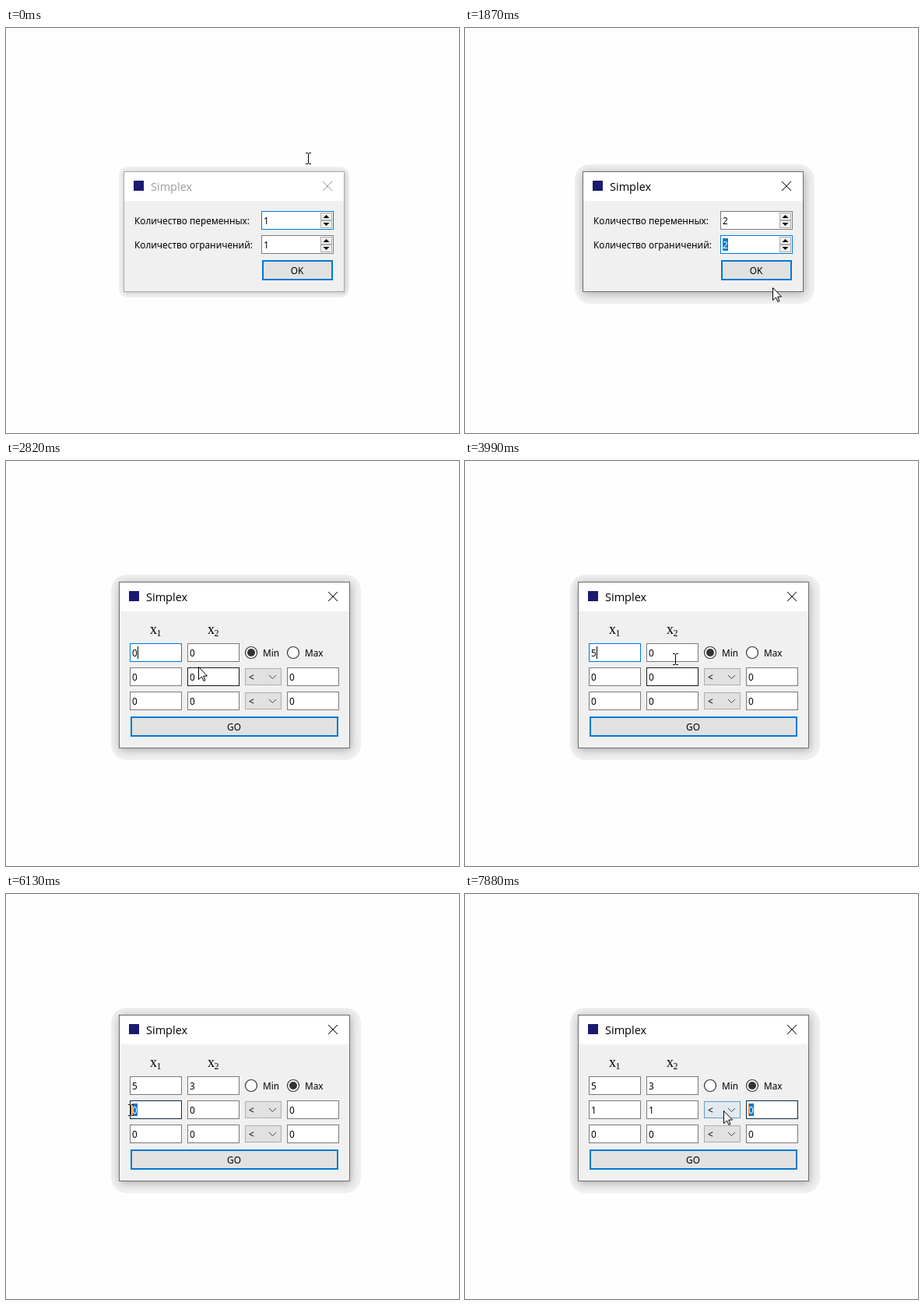
Animation, 582 px wide and 520 px high, one loop 8 s. Source, as an HTML page with a canvas:

```html
<!DOCTYPE html>
<html lang="ru">
<head>
<meta charset="utf-8">
<title>Simplex</title>
<style>
html, body { margin: 0; width: 100%; height: 100%; overflow: hidden; background: #fefefe; }
canvas { display: block; }
</style>
</head>
<body>
<canvas id="stage" width="582" height="520"></canvas>
<script>
const ctx = document.getElementById('stage').getContext('2d');
const LOOP = 8000, STEPS = 60, SWITCH = 19;
const BLUE = '#0078d7', GREY = '#7a7a7a', DARK = '#171717', DEEP = '#0a2c48', FACE = '#f0f0f0';
const UI = '11.8px "Noto Sans", sans-serif';

// Pointer moves: start step, end step, x, y
const moves = [
  [1, 5, 411, 241], [8, 9, 412, 273], [11, 14, 395, 333], [14, 17, 374, 315],
  [18, 22, 205, 247], [25, 27, 104, 250], [28, 29, 250, 278], [29, 30, 270, 254],
  [33, 35, 185, 248], [36, 38, 330, 278], [38, 39, 373, 243], [41, 43, 200, 276],
  [43, 48, 134, 278], [49, 51, 265, 279], [51, 53, 227, 279], [55, 57, 395, 279],
  [57, 59, 332, 278]
];

// Each edit drags a selection from `press` on, then types a digit
const edits = [
  { col: 0, row: 0, value: 5, press: 25, type: 28 },
  { col: 1, row: 0, value: 3, press: 33, type: 36 },
  { col: 0, row: 1, value: 1, press: 43, type: 49 },
  { col: 1, row: 1, value: 1, press: 51, type: 55 },
  { col: 2, row: 1, value: 0, press: 57, type: STEPS }
];

const colX = [159, 233, 361], rowY = row => 234 + 31 * row;
const cells = [];
for (let row = 0; row < 3; row++)
  for (let col = 0; col < (row ? 3 : 2); col++) cells.push({ col, row });

let step, now, before;

function pointer(i) {
  let x = 388, y = 167;
  for (const [from, to, tx, ty] of moves) {
    const k = Math.max(0, Math.min(1, (i - from) / (to - from)));
    x += (tx - x) * k;
    y += (ty - y) * k;
  }
  return [Math.round(x), Math.round(y)];
}

const inside = ([px, py], x, y, w, h) => px >= x && px < x + w && py >= y && py < y + h;

function rect(x, y, w, h, color) {
  ctx.fillStyle = color;
  ctx.fillRect(x, y, w, h);
}

function box(x, y, w, h, fill, edge, line = 1) {
  rect(x, y, w, h, edge);
  rect(x + line, y + line, w - 2 * line, h - 2 * line, fill);
}

function text(s, x, y, color = '#000', font = UI, align = 'left') {
  ctx.font = font;
  ctx.fillStyle = color;
  ctx.textAlign = align;
  ctx.fillText(s, x, y);
}

function poly(points, fill, edge, closed = true) {
  ctx.beginPath();
  points.forEach(([x, y]) => ctx.lineTo(x, y));
  if (closed) ctx.closePath();
  if (fill) { ctx.fillStyle = fill; ctx.fill(); }
  if (edge) { ctx.strokeStyle = edge; ctx.lineWidth = 1; ctx.stroke(); }
}

function disc(x, y, r, fill, edge) {
  ctx.beginPath();
  ctx.arc(x, y, r, 0, 7);
  ctx.fillStyle = fill;
  ctx.fill();
  if (edge) { ctx.strokeStyle = edge; ctx.lineWidth = 1.2; ctx.stroke(); }
}

function frame(x, y, w, h, active) {
  const [l, t, r, b] = active ? [10, 9, 14, 15] : [6, 6, 6, 7];
  ctx.save();
  ctx.beginPath();
  ctx.roundRect(x - l, y - t, w + l + r, h + t + b, active ? 20 : 12);
  ctx.fillStyle = FACE;
  ctx.fill();
  ctx.clip();
  ctx.shadowColor = active ? 'rgba(0,0,0,.3)' : 'rgba(0,0,0,.2)';
  ctx.shadowBlur = active ? 11 : 6;
  ctx.shadowOffsetX = 1;
  ctx.shadowOffsetY = active ? 2 : 1;
  rect(x, y, w, h, '#777');
  ctx.restore();

  box(x, y, w, h, FACE, active ? '#6e6e6e' : '#a8a8a8');
  rect(x + 1, y + 1, w - 2, 37, '#fff');
  rect(x + 13, y + 12, 13, 13, '#1a1a70');
  const ink = active ? '#000' : '#999';
  text('Simplex', x + 35, y + 25, ink, '14.5px "Open Sans", sans-serif');
  const cx = x + w - 22, cy = y + 19;
  for (const d of [6, -6]) poly([[cx - 6, cy - d], [cx + 6, cy + d]], null, ink, false);
}

function content(s, x, y, selected) {
  if (selected) rect(x, y - 13, 7, 16, BLUE);
  text(s, x, y, selected ? '#fff' : '#000');
}

const edgeColor = (hover, focused) =>
  hover ? (focused ? DEEP : DARK) : focused ? BLUE : GREY;

function spin(y, value, focused, selected) {
  const area = [328, y, 93, 24];
  const hover = inside(now, ...area) || inside(before, ...area);
  box(...area, '#fff', edgeColor(hover, focused));
  content(value, 331, y + 17, selected);
  const lit = inside(before, 404, y, 16, 24);
  for (const [top, d] of [[y + 2, -2], [y + 12, 2]]) {
    box(404, top, 15, 10, lit ? '#e2ecf4' : FACE, lit ? '#9db8cc' : '#acacac');
    const cy = top + 5;
    poly([[407.5, cy - d], [415.5, cy - d], [411.5, cy + d]], '#000');
  }
}

function button(label, x, y, w, pressed) {
  const hover = inside(now, x, y, w, 26);
  if (pressed) box(x, y, w, 26, '#d5e8f8', '#0060a8');
  else box(x, y, w, 26, hover ? '#e5f1fb' : '#e1e1e1', BLUE, 2);
  text(label, x + w / 2 - .5, y + 18, '#000', UI, 'center');
}

function sizeDialog() {
  frame(151, 184, 284, 155, step > 0 && step < SWITCH - 1);
  text('Количество переменных:', 165, 252);
  text('Количество ограничений:', 165, 283);
  spin(235, step < 6 ? 1 : 2, step < 10, step >= 6 && step < 10);
  spin(266, step < 11 ? 1 : 2, step >= 10, step >= 11 && step < 17);
  button('OK', 329, 298, 91, step >= 17);
}

function field({ col, row }) {
  const x = colX[col], y = rowY(row);
  const edit = edits.find(e => e.col === col && e.row === row);
  const current = edits.findLast(e => step >= e.press) || edits[0];
  const focused = edit === current;
  const typed = edit && step >= edit.type;
  const selected = focused && step > edit.press && !typed;
  box(x, y, 67, 24, '#fff', edgeColor(inside(before, x, y, 67, 24), focused));
  content(typed ? edit.value : 0, x + 3, y + 17, selected);
  if (selected) rect(x + 3, y + 4, 1, 16, '#ff8728');
  else if (focused) rect(x + 10, y + 4, 1, 16, '#000');
}

function combo(y) {
  const area = [307, y, 47, 22];
  const lit = inside(now, ...area) || inside(before, ...area);
  box(...area, lit ? '#e2e9ef' : '#e1e1e1', lit ? '#6a9abf' : '#adadad');
  text('<', 312, y + 16);
  poly([[338, y + 9], [342.5, y + 13.5], [347, y + 9]], null, '#444', false);
}

function radio(label, x, checked) {
  const lit = inside(now, x - 8, 238, 46, 17);
  disc(x, 246, 7.5, '#fff', lit ? BLUE : '#333');
  if (checked) disc(x, 246, 5, '#333');
  text(label, x + 15, 251);
}

function taskDialog() {
  frame(145, 155, 297, 214, step > SWITCH);
  [185, 259].forEach((x, n) => {
    text('x', x, 222, '#000', '18px "Liberation Serif", serif');
    text(n + 1, x + 8.5, 225, '#000', '12px "Liberation Serif", serif');
  });
  cells.forEach(field);
  radio('Min', 315, step < 41);
  radio('Max', 369, step >= 41);
  combo(266);
  combo(297);
  button('GO', 160, 328, 267, false);
}

// The pointer is a text beam outside the window and over edit boxes
function isBeam() {
  if (step < SWITCH - 1) return !inside(now, 151, 184, 284, 155);
  return !inside(now, 145, 155, 297, 214) ||
    cells.some(c => inside(now, colX[c.col] - 2, rowY(c.row), 71, 24));
}

function drawPointer([x, y]) {
  if (isBeam()) {
    rect(x, y - 6, 1, 13, '#000');
    for (const dy of [-7, 7])
      for (const dx of [-3, 1]) rect(x + dx, y + dy, 3, 1, '#000');
    return;
  }
  const shape = [[0, 0], [0, 16], [4, 12.5], [6.5, 18], [8.5, 17], [6.2, 11.6], [11, 11.5]];
  poly(shape.map(([dx, dy]) => [x + dx + .5, y + dy + .5]), '#fff', '#000');
}

function draw(time) {
  step = Math.min(STEPS - 1, Math.floor((time % LOOP + 15) * STEPS / LOOP));
  now = pointer(step);
  before = pointer(step - 1);
  rect(0, 0, 582, 520, '#fefefe');
  if (step < SWITCH) sizeDialog();
  else taskDialog();
  drawPointer(now);
}

const start = performance.now();
function tick() {
  draw(performance.now() - start);
  requestAnimationFrame(tick);
}
tick();
</script>
</body>
</html>
```
